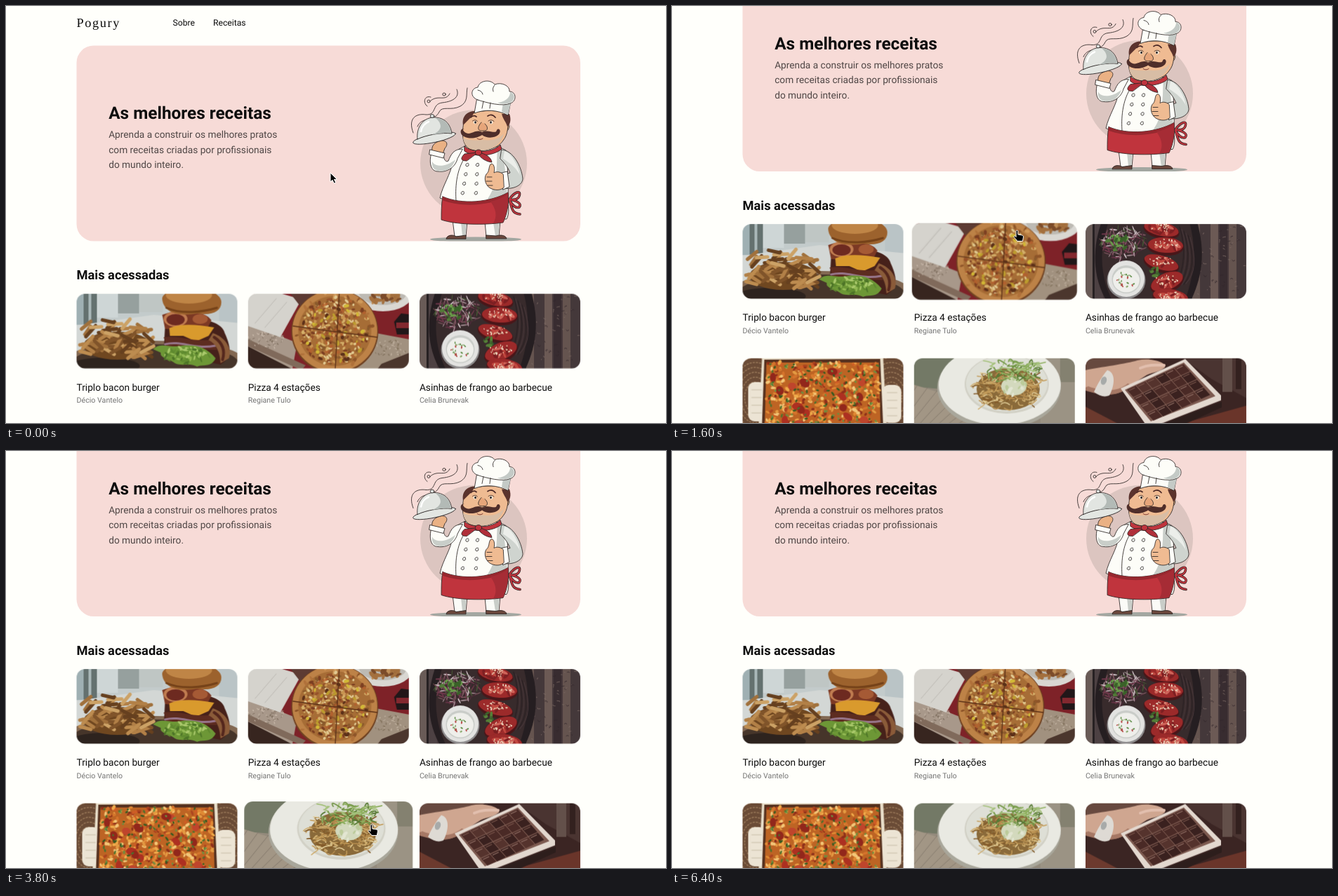
An HTML page that plays this animation: 940 px wide and 595 px high, repeating every 6800 ms.

```html
<!DOCTYPE html>
<html lang="pt-BR">
<head>
<meta charset="utf-8">
<title>Receitas</title>
<style>
html, body { margin: 0; width: 100%; height: 100%; overflow: hidden; background: #fffffb; }
svg { display: block; width: 940px; height: 595px; text-rendering: geometricPrecision; }
text { font-family: Roboto, sans-serif; fill: #0d0d0d; }
.logo { font: 18.27px "Liberation Serif", serif; letter-spacing: 1.64px; }
.nav { font-size: 12.18px; }
.h1 { font-size: 24.36px; font-weight: 700; }
.h2 { font-size: 18.27px; font-weight: 700; }
.lead { font-size: 13.7px; fill: #4f4645; }
.title { font-size: 13.7px; }
.author { font-size: 10.66px; fill: #747474; }
.photo { transform-origin: 114.5px 53.25px; }
.ink { stroke: #2b2524; stroke-width: .85; stroke-linejoin: round; stroke-linecap: round; }
</style>
</head>
<body>
<svg id="stage" viewBox="0 0 940 595"></svg>
<script>
const LOOP = 6800, STEP = 100, GROW = 200;

// Drawing helpers
let seed = 7;
const rnd = (a = 0, b = 1) => {
  seed = (seed * 16807) % 2147483647;
  return +(a + (b - a) * seed / 2147483647).toFixed(2);
};
const pick = list => list[Math.floor(rnd(0, list.length - .01))];
const path = (d, fill, extra = '') => `<path d="${d}" fill="${fill}" ${extra}/>`;
const line = (d, color, w = 1) => path(d, 'none', `stroke="${color}" stroke-width="${w}" stroke-linecap="round"`);
const ink = (d, fill = 'none') => path(d, fill, 'class="ink"');
const rect = (x, y, w, h, fill, extra = '') =>
  `<rect x="${x}" y="${y}" width="${w}" height="${h}" fill="${fill}" ${extra}/>`;
const ground = fill => rect(-6, -6, 241, 119, fill);
const oval = (x, y, rx, ry, fill, rot = 0, extra = '') =>
  `<ellipse cx="${x}" cy="${y}" rx="${rx}" ry="${ry}" fill="${fill}" transform="rotate(${rot} ${x} ${y})" ${extra}/>`;
const text = (x, y, cls, s) => `<text x="${x}" y="${y}" class="${cls}">${s}</text>`;
const repeat = (n, fn) => Array.from({ length: n }, (_, i) => fn(i)).join('');
// Random spots inside an ellipse
const scatter = (n, [cx, cy, rx, ry], w, h, colors) => repeat(n, () => {
  const a = rnd(0, 6.283), r = Math.sqrt(rnd());
  return oval((cx + rx * r * Math.cos(a)).toFixed(1), (cy + ry * r * Math.sin(a)).toFixed(1),
    w * rnd(.6, 1.2), h * rnd(.6, 1.2), pick(colors), Math.round(rnd(0, 180)));
});
// Random short curved strands inside a box
const strands = (n, [x0, x1, y0, y1], reach, w, colors) => repeat(n, () =>
  line(`M${rnd(x0, x1)} ${rnd(y0, y1)} q${rnd(-reach, reach)} ${rnd(-reach, reach)} ${rnd(-reach, reach) * 1.4} ${rnd(-reach, reach) * .6}`,
    pick(colors), w));

const burger = () =>
  ground('#c3cbcb') + rect(-6, -6, 16, 50, '#9fb0b3') + rect(10, -6, 19, 50, '#64716f') + rect(17, -6, 4, 50, '#a9b7b8') +
  rect(29, -6, 30, 40, '#ced6d6') + rect(59, -6, 30, 34, '#96a09e') + rect(89, -6, 34, 32, '#bfc6c4') +
  rect(203, -6, 32, 62, '#bac4c6') + path('M-6 46 L110 30 L235 42 V113 H-6Z', '#d3d7d5') +
  oval(112, 93, 124, 26, '#826852') + oval(112, 98, 118, 26, '#46352a') + oval(40, 103, 50, 12, '#2d231e') +
  oval(58, 74, 48, 20, '#6f4720') +
  repeat(60, () => {
    const x = rnd(14, 104), y = rnd(44, 88) - (x > 40 && x < 75 ? 8 : 0);
    return rect(x - 12, y - 2.5, rnd(18, 28), 5, pick(['#a1713c', '#bd8c50', '#80542a', '#cca266', '#b28047', '#66401f']),
      `rx="2.5" transform="rotate(${rnd(-65, 45)} ${x} ${y})"`);
  }) +
  path('M126 46 C135 32 205 30 211 56 C222 80 220 92 205 101 L124 84Z', '#46211a') +
  path('M122 30 C148 20 184 24 192 38 L184 54 L126 50Z', '#7c3924') +
  oval(141, 36, 17, 11, '#c07c50') + oval(141, 37, 13, 8, '#6d2a20') + oval(176, 36, 11, 7, '#a55a35') +
  path('M132 49 C150 42 170 44 196 48 L188 60 L170 68 L152 60 L133 60Z', '#d99a2d') +
  path('M124 62 C145 58 165 70 194 65 L200 80 L130 78Z', '#5d2c20') +
  line('M126 72 C150 66 165 80 198 74', '#97758a', 3) +
  path('M194 56 C212 62 222 78 217 92 L205 99 C204 84 200 72 188 66Z', '#8a5b39') +
  line('M196 62 C208 70 212 80 208 94', '#54271d', 4) +
  path('M109 79 C120 68 135 78 150 74 C170 72 185 76 198 92 C192 106 178 100 172 104 C160 98 150 104 140 99 C132 92 118 92 120 84Z', '#6d9736') +
  scatter(60, [157, 88, 34, 11], 4, 1.5, ['#93ba54', '#4d7428', '#aac96c', '#5f8a30']) +
  path('M122 8 C120 -12 202 -14 206 10 C208 24 194 32 172 28 C150 32 125 30 122 8Z', '#9c622d') +
  oval(160, 2, 33, 12, '#bf8546') + line('M128 20 C150 30 180 26 200 20', '#754219', 3);

const pizza = () =>
  ground('#7e2228') + path('M-6 40 L70 70 L62 113 H-6Z', '#a8988a') +
  path('M-6 72 L74 113 H-6Z', '#37251f') + path('M-6 62 L82 102 L76 109 L-6 72Z', '#806a5b') +
  path('M182 56 L235 66 V113 H140Z', '#a1917f') + path('M190 100 L235 82 V113 H180Z', '#4b362d') +
  scatter(60, [26, 66, 30, 12], 2, .7, ['#c9baab', '#827263']) + scatter(40, [202, 78, 24, 12], 2, .8, ['#bdae9c', '#84745f']) +
  path('M-6 5 L28 -6 L76 8 L46 62 L-6 44Z', '#d5d3cd') + line('M10 42 L40 7 M24 48 L55 12', '#bdbab4') +
  path('M56 -6 H104 L76 20Z', '#5d3b33') +
  oval(192, 1, 42, 24, '#d9d7d2') + oval(192, -2, 34, 18, '#bdbab3') +
  scatter(30, [192, 3, 24, 10], 6, 3, ['#a4703e', '#c0905a', '#7c4c2a']) +
  path('M208 40 L218 28 L235 30 V58 H212Z', '#211719') + rect(211, 41, 18, 8, '#83282f') +
  oval(123.5, 54, 62, 60, '#6f4121') + oval(123.5, 53, 60.5, 58.5, '#bd8247') + oval(123.5, 53, 52, 50, '#a66d36') +
  scatter(50, [123.5, 53, 59, 57], 4, 2, ['#cf9a5b', '#b0713a', '#8e5529']) +
  scatter(330, [123.5, 53, 50, 48], 3, 1.9, ['#d5b06a', '#96512a', '#7c3f22', '#c79450', '#e2ca92', '#8a5a2c', '#b2612f']) +
  scatter(40, [123.5, 53, 46, 44], 3.4, 2.2, ['#d2b836', '#bd9d2e', '#5c3019']) +
  line('M130 -4 L124 110 M64 46 L184 62', '#5d3218', 1.4);

const wings = () =>
  ground('#45383a') +
  repeat(7, i => rect(152 + i * 13, -6, 11, 119, ['#65544f', '#44383a', '#6c5a55', '#382c30'][i % 4])) +
  strands(50, [156, 226, 0, 100], 3, .8, ['#7e6c66', '#33282c']) +
  rect(-6, -6, 16, 119, '#695b57') + rect(10, -6, 3, 119, '#262022') + rect(13, -6, 12, 119, '#4d4143') +
  path('M24 -6 H158 C172 40 166 78 148 113 H32 C8 76 10 30 24 -6Z', '#251e21') +
  path('M34 -6 H147 C160 38 154 78 140 113 H40 C18 72 20 30 34 -6Z', '#382b2c') +
  repeat(6, i => line(`M${134 + i * 3} ${4 + i * 3} q14 45 -6 ${86 - i * 4}`, i % 2 ? '#463639' : '#2b2124', 1.2)) +
  scatter(130, [54, 28, 32, 24], 6, .9, ['#a78f96', '#6f384b', '#cdbfc3', '#7f5560', '#465535', '#4a2b37']) +
  scatter(30, [46, 26, 15, 12], 3.5, 2, ['#527b38', '#3a6229', '#6c9b4b']) +
  oval(58, 80, 27.5, 27, '#8d8b8c') + oval(58, 78, 26, 26, '#e3e3e1') + oval(58, 79, 20.5, 20, '#c9ccc8') + oval(58, 80, 19, 17.5, '#efefeb') +
  scatter(22, [58, 79, 14, 11], 1.7, 1, ['#5c8c45', '#b84848', '#87a868']) +
  [[108, 7, 25, 10, 12], [114, 30, 25, 11, 3], [108, 55, 25, 10, 16], [116, 82, 24, 12, -22], [121, 103, 25, 10, 8]]
    .map(([x, y, a, b, r]) => oval(x, y + 2, a + 1, b + 2, '#4a1619', r) + oval(x, y, a, b, '#9c2a2a', r) +
      scatter(10, [x, y, a * .7, b * .6], 6, 2.4, ['#c24940', '#7d1f22', '#d0655a']) +
      scatter(24, [x, y - 2, a * .75, b * .6], 1.4, .9, ['#eed9c2', '#e2bb9c'])).join('') +
  scatter(8, [97, 68, 9, 7], 4, 2, ['#3d612c', '#568038']);

const bake = () =>
  ground('#d9e0e2') + oval(18, 56, 42, 60, '#6a4b36') + oval(212, 56, 40, 60, '#6a4b36') +
  repeat(6, i => [18, 212].map(x =>
    oval(x, 56, 40 - i * 5, 57 - i * 7, 'none', 0, 'stroke="#9b7a5a" stroke-width="1.5" stroke-dasharray="3 1.5"')).join('')) +
  path('M28 -6 H200 L206 113 H22Z', '#e9dfca') +
  rect(8, 34, 25, 56, '#ece4d4', 'rx="9"') + rect(199, 38, 27, 54, '#ece4d4', 'rx="9"') +
  repeat(4, i => line(`M13 ${45 + i * 11} h14 M206 ${49 + i * 11} h14`, '#c9bea9', 1)) +
  path('M31 2 L196 1 L201 113 H27Z', '#54301e') + path('M34 6 H194 L197 113 H31Z', '#bd6424') +
  repeat(520, () => oval(rnd(34, 195), rnd(6, 108), rnd(2, 4), rnd(1.3, 2.4),
    pick(['#e08a34', '#f0ab4b', '#ad4420', '#cf5d26', '#f3c678', '#8f301a', '#e49b43', '#d5742c']), rnd(0, 180))) +
  repeat(20, () => oval(rnd(42, 188), rnd(10, 104), rnd(5, 8), rnd(4, 6), pick(['#ad3021', '#bf452c', '#92271b']), rnd(0, 90))) +
  repeat(150, () => oval(rnd(36, 194), rnd(6, 106), rnd(1.5, 3), 1.3, pick(['#4a722d', '#335a20', '#6d9040']), rnd(0, 180)));

const pasta = () =>
  ground('#938a7c') + path('M-6 -6 H74 L40 44 L-6 40Z', '#737966') +
  path('M-6 36 L60 56 L120 113 H-6Z', '#a29685') + path('M180 -6 H235 V113 H180Z', '#9b9384') +
  repeat(9, i => line(`M${i * 12 - 40} 107 L${i * 14 + 5} ${38 + i * 4}`, '#81766a', .8)) +
  rect(208, -6, 27, 40, '#848170') +
  oval(121, 42, 88, 59, '#a9a79b') + oval(122, 38, 87, 57, '#e9e9e2') +
  oval(132, 37, 60, 42, '#d2d1c6') + oval(132, 36, 58, 40, '#dedfd6') + oval(134, 44, 45, 30, '#8a6a3a') +
  strands(150, [94, 174, 24, 68], 11, 1.5, ['#cfae70', '#b58c4e', '#e0cb96', '#845c2b', '#c49c5a']) +
  oval(142, 40, 18, 13, '#d3d9bd') + scatter(20, [142, 40, 18, 13], 4, 2, ['#e3e6d2', '#bccb9a']) +
  strands(75, [104, 178, 4, 32], 10, 1.7, ['#749749', '#8fb05f', '#587b35', '#a6c27d']);

const sweets = () =>
  ground('#3b2523') + path('M-6 -6 H100 L70 20 L-6 24Z', '#67493f') +
  path('M130 -6 H235 V60 L180 30Z', '#4a3431') + path('M120 98 L235 66 V113 H110Z', '#6a352a') +
  path('M-6 66 L84 113 H-6Z', '#6c3a2e') + rect(195, -6, 14, 54, '#63504a') + rect(214, -6, 8, 50, '#33211f') +
  path('M-6 18 C25 12 58 8 74 3 C94 -1 116 6 113 13 C104 21 92 20 84 26 L62 40 C45 57 22 53 -6 42Z', '#cfa690') +
  path('M4 40 C30 50 48 46 60 36 L66 38 C46 57 22 54 -6 44Z', '#a67865') + line('M78 14 C92 8 102 10 112 10', '#e2bfae', 4) +
  path('M31 17 C43 20 42 38 34 53 C27 56 20 54 12 48 C18 35 24 25 31 17Z', '#dedad4') + oval(26, 32, 4, 6, '#a7aaa9', 18) +
  path('M50 43 L142 1 L193 53 V60 L93 99 L86 95Z', '#e3d8cf') + path('M56 45 L140 6 L185 54 L93 90Z', '#7d5a50') +
  repeat(24, i => {
    const u = i % 6, v = Math.floor(i / 6), x = 59 + u * 13.6 + v * 9.6, y = 45 - u * 6.2 + v * 11.3;
    return path(`M${x} ${y} l12.6 -5.8 9 10.2 -12.6 5.8Z`, pick(['#4a2a26', '#3a211f', '#55332d'])) +
      line(`M${x + 3} ${y + 1} l8 -3.7`, pick(['#7a564c', '#947268']), 1.1);
  }) +
  path('M78 92 L94 100 L194 62 V70 L100 113 H84Z', '#2d1e1c');

const chef = () =>
  oval(666, 224.5, 76, 76, '#dcc5c0') + oval(669, 333, 65, 3.6, '#a3a7a1') +
  ink('M580 181 C572 160 584 153 598 155 C614 156 606 140 621 138 C640 136 646 128 642 119') +
  ink('M586 172 C592 157 610 166 617 151 C621 142 634 150 647 143 C659 136 655 126 657 117') +
  ink('M600 143 C593 138 596 127 605 130 M605 135 C616 126 626 137 632 125') +
  oval(602, 136, 2, 2, 'none', 0, 'class="ink"') + oval(624, 126, 2.2, 2, 'none', 0, 'class="ink"') +
  ink('M636 305 L639 329 H655 L657 307Z', '#fbfbf7') + ink('M682 308 L684 329 H702 L704 306Z', '#fbfbf7') +
  path('M648 309 H656 L654 328 H650Z M694 309 H703 L701 328 H697Z', '#c9cdc8') +
  ink('M627 332 C628 326 638 326 641 329 L655 327 V332Z', '#6b473c') +
  ink('M684 327 L698 328 C704 326 712 327 713 332 H684Z', '#6b473c') +
  ink('M707 262 C718 278 717 298 713 304 L700 304Z', '#e6e8e3') +
  ink('M654 200 C640 205 636 212 636 222 C634 240 622 255 618 274 C640 283 690 283 715 270 C716 250 714 225 712 206 C700 198 670 196 654 200Z', '#fdfdf8') +
  path('M700 202 C711 206 711 240 714 269 C706 275 696 277 684 278 C702 255 698 225 700 202Z', '#c9cec9') +
  ink('M655 214 C640 235 640 262 641 278') +
  repeat(8, i => {
    const row = i >> 1, x = 657 - row * 2.2 + (i % 2) * (14.5 + row * 1.5), y = 226.5 + row * 13.4;
    return ink(`M${x + 2} ${y - 1.6} C${x - 1} ${y - 4} ${x - 4} ${y + 1} ${x - 1} ${y + 2.2} C${x + 1} ${y + 3} ${x + 2.6} ${y + 1} ${x + 2} ${y - .4}`, '#f1f3ef');
  }) +
  ink('M650 204 C638 204 634 211 630 221 C626 224 622 217 624 210 L606 209 C602 224 605 236 615 236 C628 238 640 230 643 218Z', '#fdfdf8') +
  path('M607 222 C612 232 630 228 640 219 C636 232 626 237 615 235 C609 234 606 229 607 222Z', '#c9cec9') +
  ink('M607 208 C605 199 611 194 620 192 C630 192 629 199 625 203 L622 211Z', '#eab184') +
  ink('M604 205 L625 210 L623 217 L603 212Z', '#fdfdf8') +
  oval(610, 188.5, 31, 6, '#e3e6e2', -12, 'class="ink"') +
  ink('M586 190 C584 173 594 160 608 159 C624 158 633 168 635 182 C622 180 598 184 586 190Z', '#e2e5e1') +
  path('M612 160 C624 160 632 169 634 181 C628 180 620 181 606 184 C622 178 622 168 612 160Z', '#b3bab6') +
  line('M591 179 C592 172 597 167 602 165', '#fff', 2.5) + oval(607, 157, 2.8, 2.4, '#dfe4e1', 0, 'class="ink"') +
  ink('M706 205 C722 206 734 228 736 246 C736 256 722 262 709 260 L708 241 L718 238 C714 228 708 222 704 218Z', '#cfd4cf') +
  path('M710 207 C720 210 730 228 732 242 C728 232 718 224 708 218Z', '#eceeea') +
  ink('M622 272 C650 284 690 280 715 266 C717 280 714 296 708 309 C680 313 640 312 620 305 C620 295 620 282 622 272Z', '#c0343d') +
  path('M622 272 C650 284 690 280 715 266 V271 C690 285 650 288 621 277Z', '#97282f') +
  path('M690 279 C700 277 710 272 715 268 C716 284 713 298 708 308 L694 310 C700 300 698 290 690 279Z', '#a62c35') +
  ['#2b2524', '#c0343d'].map((c, i) =>
    line('M717 276 C724 265 734 262 731 271 C729 277 721 277 717 276 C728 278 735 282 731 287 C726 289 721 284 717 277 C721 288 720 296 732 297', c, 3.6 - i * 1.4)).join('') +
  ink('M706 238 L714 236 L717 258 L708 262Z', '#fdfdf8') +
  ink('M708 240 C704 236 698 236 695 238 C697 230 694 223 690 226 C687 230 689 236 684 240 C680 246 683 258 692 261 C700 264 706 262 709 259Z', '#efbb92') +
  ink('M685 244 h7 M684 250 h8 M686 256 h7') +
  oval(712, 172, 4.5, 6.5, '#eab184', 0, 'class="ink"') +
  ink('M653 160 C650 175 647 196 660 204 C675 210 700 205 708 192 C715 184 716 170 714 155 C700 146 664 148 653 160Z', '#efbb92') +
  path('M651 188 C652 200 662 206 675 206 C694 207 706 195 709 182 C700 192 690 192 678 191 C668 192 658 192 651 188Z', '#d8bda5') +
  path('M651 170 C649 158 656 150 668 150 L664 157 L657 164Z M706 154 H717 C720 162 718 170 714 172 C712 165 708 162 706 154Z', '#5b332d') +
  line('M662 159 q4 -4 8 -1 M686 157 q6 -4 11 2', '#4a2724', 1.7) +
  oval(668, 166, 2.2, 2.2, '#fbf3e6') + oval(691, 166, 2.4, 2.4, '#fbf3e6') + oval(668.5, 166, 1.3, 1.7, '#211b1b') + oval(690.5, 166, 1.3, 1.7, '#211b1b') +
  line('M664.5 164 q4 -3 7 .5 M687 164 q4 -3 8 .5', '#3b2824', .8) +
  ink('M677 166 C670 174 672 179 680 178 C687 179 687 172 682 168', '#e6a57a') +
  path('M678 180 C668 175 663 185 655 181 C650 178 650 175 653 175 C646 174 646 183 652 186 C661 191 672 188 678 184 C686 190 697 188 702 183 C706 178 702 173 699 177 C698 184 687 175 678 180Z', '#4f2e2a') +
  line('M671 189 q4 3 8 0', '#7b3b35', 1) +
  ink('M671 130 L667 153 C682 147 700 148 715 156 L719 136Z', '#fdfdf8') +
  path('M708 138 L719 138 L715 155 L706 151Z', '#c4cac6') +
  ink('M672 134 C660 130 662 117 672 116 C674 106 690 104 696 112 C706 108 718 114 717 122 C727 122 728 136 718 139 C708 144 684 138 672 134Z', '#fdfdf8') +
  path('M700 138 C709 137 718 132 718 123 C726 125 725 135 718 138 C713 140 706 140 700 138Z', '#c4cac6') +
  ink('M672 120 q6 1 7 6 M696 113 q-4 4 -2 9 M680 136 l-2 10 M690 138 l-1 8') +
  ink('M653 200 C664 210 692 210 704 198 L706 204 C694 215 664 216 653 207Z', '#c0343d') +
  ink('M672 209 L653 211 C648 216 646 221 656 221Z', '#b02f39') + ink('M673 209 C684 211 691 216 692 223 C684 222 677 218 672 211Z', '#b02f39') +
  oval(673, 209, 4.6, 4, '#c0343d', 0, 'class="ink"');

// Cards with the time span in which each is hovered
const cards = [
  { draw: burger, title: 'Triplo bacon burger', author: 'Décio Vantelo', hover: [5120, 5850] },
  { draw: pizza, title: 'Pizza 4 estações', author: 'Regiane Tulo', hover: [1558, 2530] },
  { draw: wings, title: 'Asinhas de frango ao barbecue', author: 'Celia Brunevak', hover: [2520, 2850] },
  { draw: bake, hover: [4190, 4660] },
  { draw: pasta, hover: [3734, 4180] },
  { draw: sweets, hover: [3050, 3560] },
];
const cardMarkup = (c, i) => {
  const x = 100.5 + (i % 3) * 244.2, y = 410.6 + Math.floor(i / 3) * 191.5;
  return `<g transform="translate(${x} ${y})"><g class="photo" clip-path="url(#frame)"><g filter="url(#soft)">${c.draw()}</g></g></g>` +
    (c.title ? text(x, 548.5, 'title', c.title) + text(x, 566.2, 'author', c.author) : '');
};

document.getElementById('stage').innerHTML = `
  <defs>
    <clipPath id="frame"><rect width="229" height="106.5" rx="12"/></clipPath>
    <clipPath id="banner"><rect x="100.5" y="56.5" width="717.5" height="279" rx="24.4"/></clipPath>
    <filter id="soft"><feGaussianBlur stdDeviation=".5"/></filter>
  </defs>
  <rect width="940" height="595" fill="#fffffb"/>
  <g id="page">
    ${text(100.5, 29.6, 'logo', 'Pogury')}${text(237.5, 28.2, 'nav', 'Sobre')}${text(295, 28.2, 'nav', 'Receitas')}
    <g clip-path="url(#banner)">${rect(100, 56, 719, 280, '#f7dbd7')}${chef()}</g>
    ${text(146.2, 161.2, 'h1', 'As melhores receitas')}
    ${['Aprenda a construir os melhores pratos', 'com receitas criadas por profissionais', 'do mundo inteiro.']
      .map((s, i) => text(146.2, 188.4 + i * 21.3, 'lead', s)).join('')}
    ${text(100.5, 390.3, 'h2', 'Mais acessadas')}
    ${cards.map(cardMarkup).join('')}
  </g>
  <g id="cursor" stroke="#fff" stroke-width="1" stroke-linejoin="round" fill="#000">
    <path id="arrow" d="M0 0 V13 L3 10.3 L5.2 15 L7.6 14 L5.4 9.4 H9.4Z"/>
    <path id="hand" d="M0 1.4 C0 -.4 2.8 -.4 2.8 1.4 V6 L8.4 7 C10 7.4 10.6 8.2 10.4 10 L9.4 15.5 H1.8 C.8 13.6 -1.8 11.4 -3 9.4 C-3 7.4 -1 7.8 0 9.6Z"/>
  </g>`;

// Motion tables: time, then values
const scrollTable = [[700, 0], [800, 1], [900, 18], [1000, 46], [1100, 73], [1200, 90], [1300, 97], [1400, 99.5]];
const cursorTable = [
  [100, 462, 238], [800, 474, 264], [1000, 478, 272.5], [1500, 485, 293], [1600, 490, 320], [2200, 515, 390],
  [2500, 531, 410], [2600, 590, 413], [2700, 606, 405], [2800, 606, 405], [2900, 612, 422], [3000, 618, 460],
  [3100, 625, 515], [3400, 622, 560], [3500, 622, 560], [3600, 588, 556], [3800, 519, 533], [4200, 329, 540],
  [4600, 258.5, 499], [4800, 252, 452], [4900, 250.5, 437], [5000, 250.5, 429], [5100, 250.5, 429],
  [5200, 256, 400], [5800, 285, 335], [6000, 300, 220], [6300, 308, 34],
];
const at = (table, t, col) => {
  const i = table.findIndex(row => row[0] >= t);
  if (i < 0) return table[table.length - 1][col];
  if (i === 0) return table[0][col];
  const a = table[i - 1], b = table[i];
  return a[col] + (b[col] - a[col]) * (t - a[0]) / (b[0] - a[0]);
};
// Close to the CSS "ease" curve
const ease = t => {
  const p = Math.min(1, Math.max(0, t / GROW));
  return p * p * (3 - 2 * p) * (1 - p) + (1 - (1 - p) ** 3) * p + .55 * p * (1 - p) ** 2;
};
const zoom = ([from, to], t) => 1 + .1 * (ease(t - from) - ease(t - to));
const hovering = t => cards.some(({ hover: [from, to] }) => t >= from && t < to);

// Held steps, sampled from the motion functions
const play = (el, prop, value) => {
  const n = LOOP / STEP;
  const frames = Array.from({ length: n + 1 }, (_, i) =>
    ({ offset: i / n, [prop]: value(Math.min(i, n - 1) * STEP), easing: 'steps(1, end)' }));
  el.animate(frames, { duration: LOOP, iterations: Infinity });
};
const find = id => document.getElementById(id);
play(find('page'), 'transform', t => `translate(0px, ${-at(scrollTable, t, 1)}px)`);
play(find('cursor'), 'transform', t => `translate(${at(cursorTable, t, 1)}px, ${at(cursorTable, t, 2)}px)`);
play(find('arrow'), 'opacity', t => t < 6400 && !hovering(t) ? 1 : 0);
play(find('hand'), 'opacity', t => t < 6400 && hovering(t) ? 1 : 0);
document.querySelectorAll('.photo').forEach((el, i) =>
  play(el, 'transform', t => `scale(${zoom(cards[i].hover, t)})`));
</script>
</body>
</html>
```
